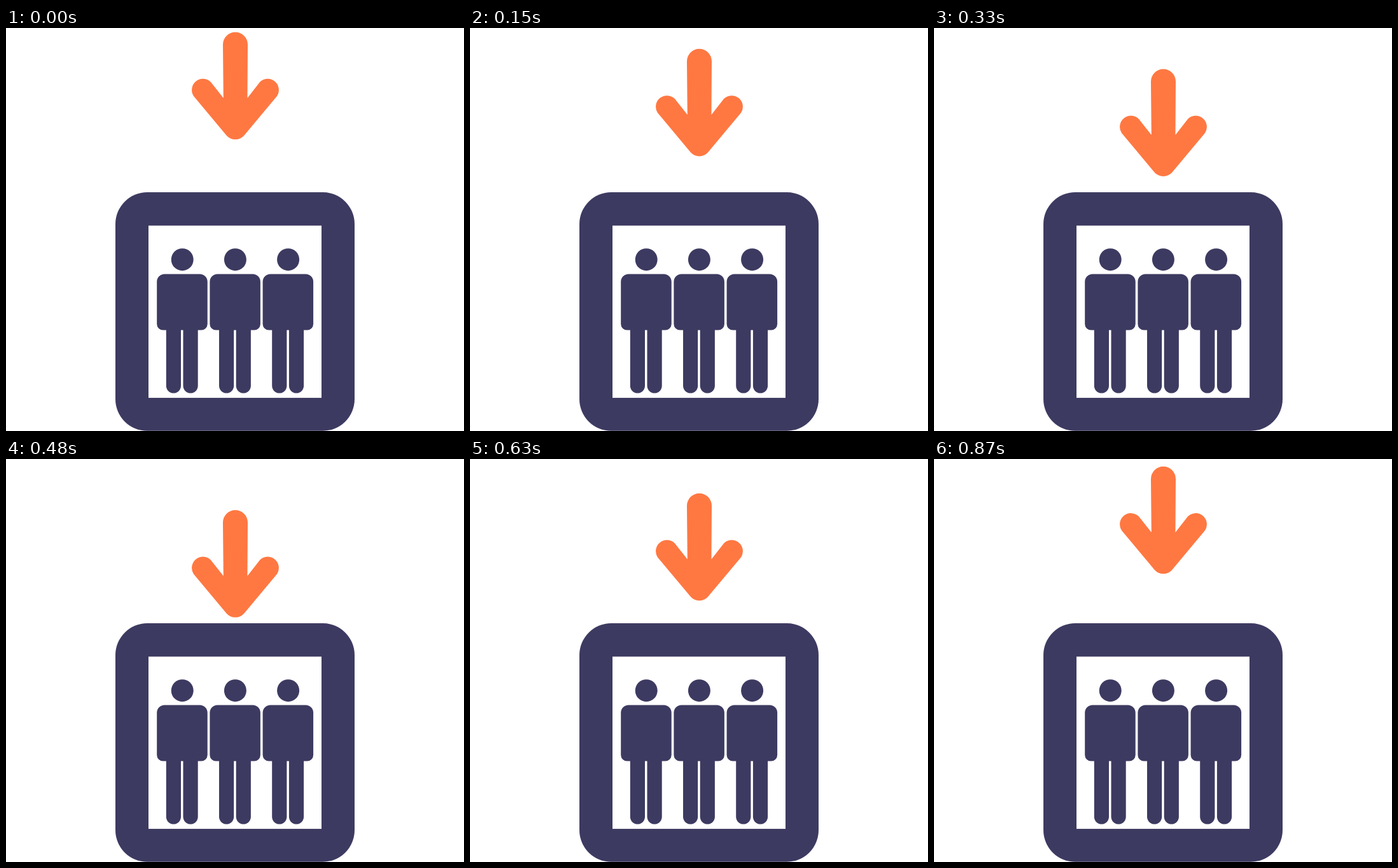
An HTML page for the animation above (0.9 s loop, 720 by 633 pixels).

```html
<!DOCTYPE html>
<html lang="en">
<head>
<meta charset="utf-8">
<title>Elevator going down</title>
<style>
  html, body { margin: 0; height: 100%; overflow: hidden; background: #fff; }
  svg { display: block; width: 720px; height: 633px; }
</style>
</head>
<body>
<svg viewBox="0 0 720 633" fill="#3d3a61">
  <defs>
    <g id="person">
      <circle cx="277.2" cy="363.7" r="17.5"/>
      <path d="M249.2 386.5H304.7a12 12 0 0 1 12 12V465a9.5 9.5 0 0 1-9.5 9.5H301.7V562a11.6 11.6 0 0 1-23.2 0V474.5H275V562a11.6 11.6 0 0 1-23.2 0V474.5H246.7a9.5 9.5 0 0 1-9.5-9.5V398.5a12 12 0 0 1 12-12Z"/>
    </g>
  </defs>
  <rect x="172" y="258" width="376" height="374.8" rx="50"/>
  <rect x="224" y="310.4" width="272" height="270.5" fill="#fff"/>
  <use href="#person"/>
  <use href="#person" x="83.2"/>
  <use href="#person" x="166.4"/>
  <path id="arrow" fill="#ff7842" d="M341 26A19.5 19.5 0 0 1 380 26L379.5 110L399 85A17.5 17.5 0 0 1 426 107L374.4 168.7A18.3 18.3 0 0 1 346.6 168.7L295 107A17.5 17.5 0 0 1 322 85L341.8 110Z"/>
</svg>
<script>
  const LOOP = 900, STEP = 30, TRAVEL = 79;
  const arrow = document.getElementById('arrow');
  const start = performance.now();

  // Constant speed down, then back up, in 30 ms steps.
  function draw(now) {
    const time = Math.max(0, now - start) % LOOP;
    const phase = Math.floor(time / STEP) * STEP / LOOP;
    const y = TRAVEL * (1 - Math.abs(1 - 2 * phase));
    arrow.setAttribute('transform', `translate(0 ${y})`);
    requestAnimationFrame(draw);
  }
  draw(start);
</script>
</body>
</html>
```
